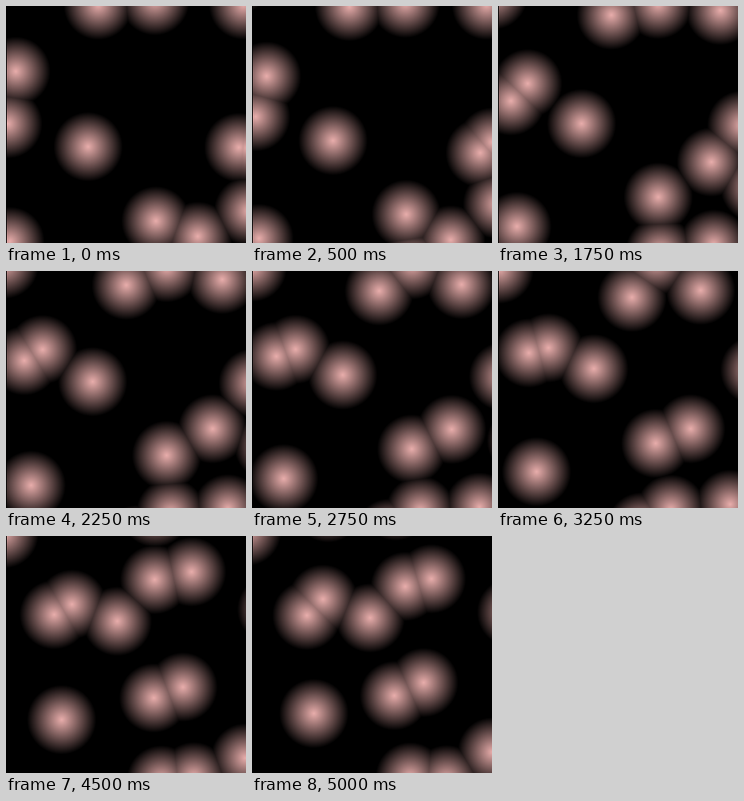
An HTML page with a canvas that plays this animation: 301 px wide and 297 px high, repeating every 5250 ms.

```html
<!DOCTYPE html>
<html lang="en">
<head>
<meta charset="utf-8">
<title>Drifting spheres</title>
<style>
  html, body { margin: 0; width: 100%; height: 100%; overflow: hidden; background: #000; }
  canvas { display: block; width: 301px; height: 297px; }
</style>
</head>
<body>
<canvas id="stage" width="301" height="297"></canvas>
<script>
const W = 301, H = 297;
const LOOP = 5250, STEP = 250;
const CELL = 100, LEFT = 1, TOP = -2;
const SPEED = 0.35; // radians per second
const RADIUS = 43.5;
const COLOR = [232, 173, 171];

// One sphere per grid cell, swinging across it on both axes.
// Each pair holds its starting phases, x then y, in radians.
const ROWS = [
  { row: -1, first: -1, phases: [[0.4, -2.9], [-0.67, 1.72], [0.78, -2.03]] },
  { row: 0, first: 0, phases: [[-0.9, -2.41], [-0.8, 1.69], [1.95, 1.495], [1.935, 2.62]] },
  { row: 1, first: 0, phases: [[-1.395, 0.02], [-1.815, -0.59], [2.2, -2.53], [-1.765, -0.63]] },
  { row: 2, first: 0, phases: [[-1.2, -1.2], [0.82, -0.43], [-0.22, -2.21], [-1.235, -0.17]] },
  { row: 3, first: 1, phases: [[-0.53, -0.55], [-1.9, 0.35]] }
];

const ctx = document.getElementById("stage").getContext("2d");
const image = ctx.createImageData(W, H);

function centers(t) {
  const swing = phase => Math.sin(phase + SPEED * t) / 2;
  return ROWS.flatMap(({ row, first, phases }) =>
    phases.map(([px, py], i) => [
      LEFT + CELL * (first + i + 0.5 + swing(px)),
      TOP + CELL * (row + 0.5 - swing(py))
    ]));
}

// Shade every pixel by its distance to the nearest center; the left column stays dark.
function draw(t) {
  const points = centers(t);
  const px = image.data;
  for (let y = 0, i = 0; y < H; y++) {
    for (let x = 0; x < W; x++, i += 4) {
      let near = Infinity;
      for (const [cx, cy] of points) {
        const dx = x - cx, dy = y - cy;
        near = Math.min(near, dx * dx + dy * dy);
      }
      const light = x > 0 ? Math.max(0, 1 - Math.sqrt(near) / RADIUS) : 0;
      for (let c = 0; c < 3; c++) px[i + c] = COLOR[c] * light;
      px[i + 3] = 255;
    }
  }
  ctx.putImageData(image, 0, 0);
}

const start = performance.now();
let shown = -1;

function tick() {
  const elapsed = (performance.now() - start) % LOOP;
  const step = Math.floor(elapsed / STEP);
  if (step !== shown) {
    shown = step;
    draw(step * STEP / 1000);
  }
  requestAnimationFrame(tick);
}
tick();
</script>
</body>
</html>
```
